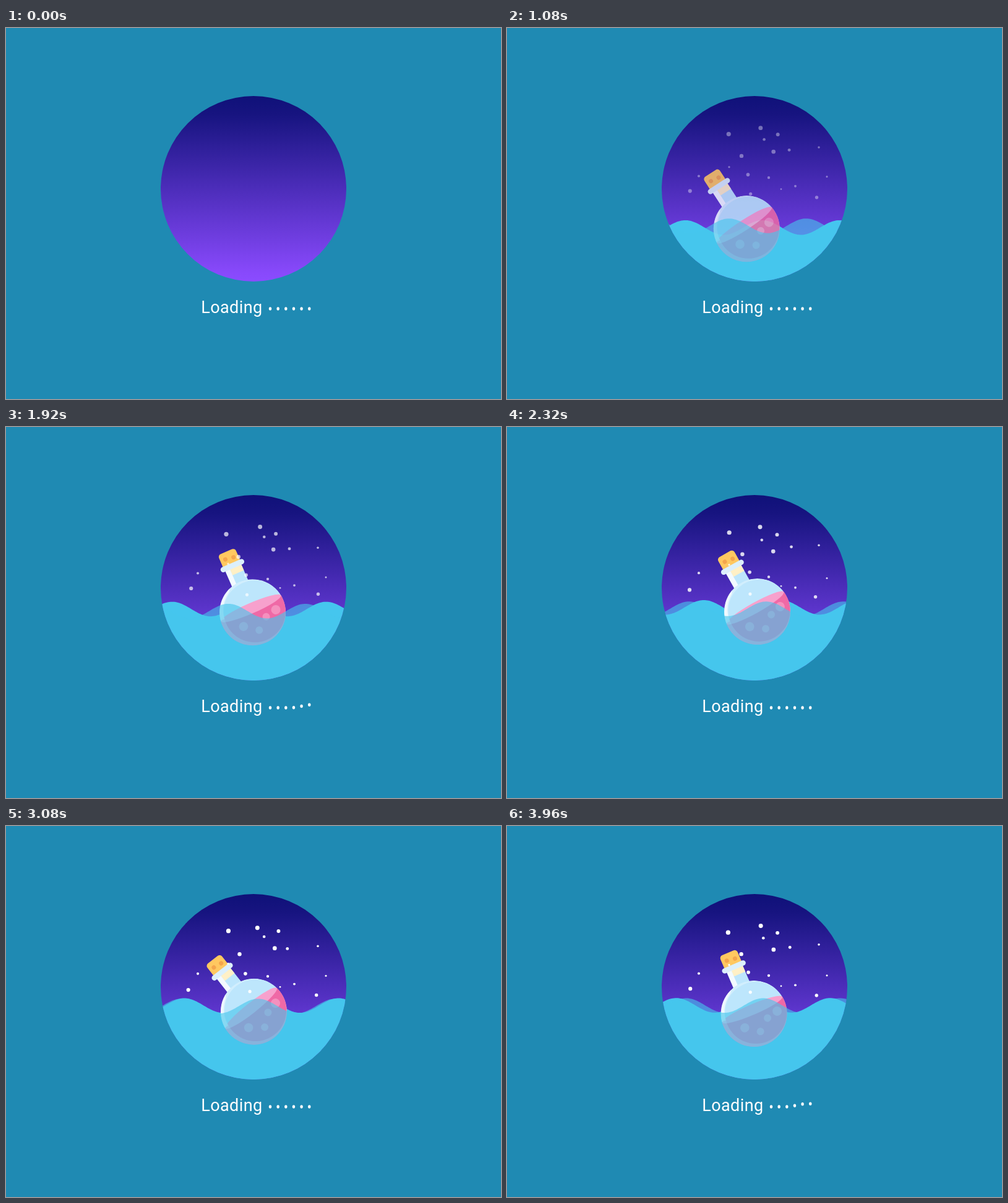
Write an HTML page that moves like this. It is 800 px wide and 600 px high and loops after 4000 ms.

```html
<!DOCTYPE html>
<html lang="en">
<head>
<meta charset="utf-8">
<title>Loading</title>
<style>
  html, body { margin: 0; width: 100%; height: 100%; overflow: hidden; background: #1f8ab3; }
  svg { display: block; width: 800px; height: 600px; }
  text { font: 27px Roboto, sans-serif; letter-spacing: .4px; fill: #fff; }
</style>
</head>
<body>
<svg viewBox="0 0 800 600">
  <defs>
    <linearGradient id="night" x1="0" y1="0" x2="0" y2="1">
      <stop offset="0" stop-color="#0f1179"/>
      <stop offset=".1" stop-color="#171480"/>
      <stop offset=".95" stop-color="#8849fb"/>
      <stop offset="1" stop-color="#8b4cff"/>
    </linearGradient>
    <clipPath id="porthole"><circle cx="400" cy="260" r="150"/></clipPath>
    <clipPath id="flask"><circle r="53.5"/></clipPath>
  </defs>
  <circle cx="400" cy="260" r="150" fill="url(#night)"/>
  <g clip-path="url(#porthole)">
    <path id="backWave" fill="#45c6ee"/>
    <g id="bottle">
      <rect x="-15" y="-107" width="30" height="26" rx="5" fill="#ffc860"/>
      <g fill="#f4a64d"><circle cx="-6.5" cy="-96" r="3.5"/><circle cx="7" cy="-94" r="3.5"/></g>
      <path d="M-14-80H14V-45H-14Z" fill="#bde6fc"/>
      <path d="M-6-80H14V-68H-6Z" fill="#fff0c6"/>
      <path d="M-14-80H-6V-45H-14Z" fill="#f3faff"/>
      <rect x="-20.5" y="-86.5" width="41" height="8.5" rx="4.2" fill="#dcf0fc"/>
      <g clip-path="url(#flask)">
        <circle r="53.5" fill="#bde6fc"/>
        <path d="M-54-7H54V54H-54Z" fill="#ef69a6"/>
        <ellipse cy="-7" rx="53" ry="8.5" fill="#f7a1cd"/>
        <g fill="#f590be">
          <circle cx="36" cy="11" r="7.5"/><circle cx="17.3" cy="15.2" r="6"/>
          <circle cx="-22.6" cy="15.2" r="7.3"/><circle cx="-1.7" cy="30.7" r="6"/>
        </g>
        <path fill="#fff" fill-opacity=".3" fill-rule="evenodd"
          d="M-53.5 0a53.5 53.5 0 1 0 107 0a53.5 53.5 0 1 0-107 0M-46.5 0a50 50 0 1 0 100 0a50 50 0 1 0-100 0"/>
        <path fill="#fff" fill-opacity=".65" d="M-54-8H-46Q-44-32-22-45L-12-60H-54Z"/>
      </g>
    </g>
    <path id="frontWave" fill="#45c6ee" fill-opacity=".61"/>
    <g id="stars" fill="#fff"></g>
  </g>
  <text x="315.3" y="461">Loading</text>
  <g id="dots" fill="#fff"></g>
</svg>
<script>
const LOOP = 4000, STEP = 40, WAVELENGTH = 124.5;
const { sin, cos, exp, abs, min, max, PI } = Math;
const $ = id => document.getElementById(id);

function add(parent, tag, attrs) {
  const node = document.createElementNS("http://www.w3.org/2000/svg", tag);
  for (const name in attrs) node.setAttribute(name, attrs[name]);
  return parent.appendChild(node);
}

const ramp = (t, from, to) => min(1, max(0, (t - from) / (to - from)));
const smooth = u => u * u * (3 - 2 * u);

// The sea rises from below and settles at y = 290
const seaLevel = (t, depth, decay) => 290 + depth * exp(-t / decay);

function wavePath(level, crest) {
  let d = "M246 420";
  for (let x = 246; x <= 554; x += 2) {
    const y = level - 11.8 * cos(2 * PI * (x - crest) / WAVELENGTH);
    d += `L${x} ${y.toFixed(2)}`;
  }
  return d + "L554 420Z";
}

// Star positions from the largest to the smallest
const stars = [
  [359, 171], [409, 162], [431, 200], [379, 207], [296, 263], [437, 173],
  [390, 237], [501, 273], [392, 270], [458, 196], [415, 180], [423, 244],
  [310, 237], [466, 257], [504, 194], [359, 222], [517, 243], [443, 260]
].map(([x, y], i) => ({ x, y, sways: i < 11, node: add($("stars"), "circle", { r: 3.6 - .13 * i }) }));

const dots = Array.from({ length: 6 }, (_, i) =>
  add($("dots"), "ellipse", { cx: 427 + 12.65 * i, rx: 2.2, ry: 2.7 }));

const wobble = (t, seed) => sin(t * .0041 + seed * 2.4) + sin(t * .0067 + seed * 4.1);

function draw(t) {
  const backLevel = seaLevel(t, 428, 420);
  $("backWave").setAttribute("d", wavePath(backLevel, 278.3 + t * .1245));
  $("frontWave").setAttribute("d", wavePath(seaLevel(t, 171, 620), 322.7 + t * .1488));

  // The bottle floats on the back wave, drifting less and rocking more with time
  const x = 400 + 58 * exp(-t / 1000) * sin(PI * (820 - t) / 1160);
  const y = backLevel + (t - 600) / 250;
  const tilt = 31.3 + 8.2 * smooth(ramp(t, 600, 2100)) * cos(2 * PI * (t - 2900) / 2000);
  $("bottle").setAttribute("transform", `translate(${x} ${y}) rotate(${-tilt})`);
  $("bottle").setAttribute("opacity", ramp(t, 240, 1240));

  $("stars").setAttribute("opacity", ramp(t, 0, 2800));
  stars.forEach((s, i) => {
    s.node.setAttribute("cx", s.x + (s.sways ? 1.8 * wobble(t, i + 1) : 0));
    s.node.setAttribute("cy", s.y + 1.5 * wobble(t, i + 31));
  });

  // A bump sweeps over the dots from left to right
  const sweep = (t % 1040 - 584) * .0183;
  dots.forEach((dot, i) => {
    const distance = min(1, abs(i - sweep) / 2.8);
    dot.setAttribute("cy", 454 - 2.5 * (1 + cos(PI * distance)));
  });
}

const start = performance.now();
function frame() {
  const t = (performance.now() - start) % LOOP;
  draw(Math.floor(t / STEP) * STEP);
  requestAnimationFrame(frame);
}
frame();
</script>
</body>
</html>
```
